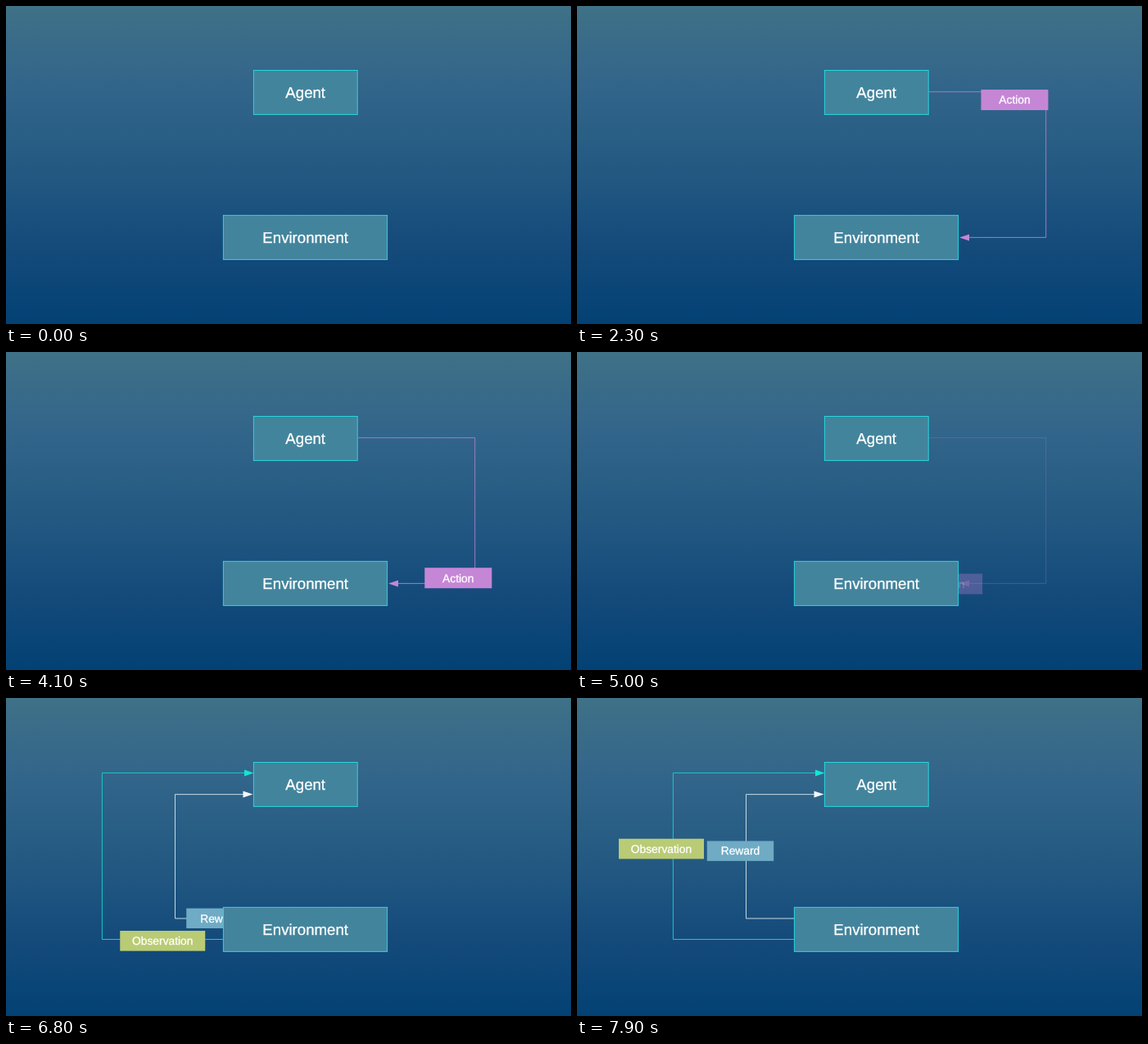
Animation, 690 px wide and 388 px high, one loop 8000 ms. Source, as an HTML page:

```html
<!DOCTYPE html>
<html lang="en">
<head>
<meta charset="utf-8">
<title>Agent and environment</title>
<style>
  html, body { margin: 0; height: 100%; overflow: hidden; background: #044073; }
  svg { display: block; width: 100%; height: 100%; }
  path { fill: none; }
  text {
    fill: #fff; stroke: #fff; stroke-width: .3; text-anchor: middle;
    font-family: "Liberation Sans", Arial, sans-serif; text-rendering: geometricPrecision;
  }
  .box rect { fill: #43849d; stroke: #27d6de; }
  .box text { font-size: 18.65px; }
  .label text { font-size: 13.8px; }
</style>
</head>
<body>
<svg viewBox="0 0 690 388">
  <defs>
    <linearGradient id="sky" x2="0" y2="1">
      <stop offset="0" stop-color="#3f7187"/>
      <stop offset=".25" stop-color="#32658a"/>
      <stop offset=".5" stop-color="#245a82"/>
      <stop offset=".75" stop-color="#154b7b"/>
      <stop offset="1" stop-color="#034174"/>
    </linearGradient>
    <marker id="head" markerWidth="12" markerHeight="8" refY="4" orient="auto" markerUnits="userSpaceOnUse">
      <path d="M0 0L12 4L0 8z" style="fill: context-stroke"/>
    </marker>
    <path id="action-route" d="M366 104.7H455C540 104.7 588 124 586 194C586 245 584 283 505 283H366"/>
    <path id="reward-route" d="M366 269H270C215 269 199.5 250 199.5 205V117.5"/>
    <path id="observation-route" d="M366 295.5H260C150 301 103 293 103 215V91.5"/>
  </defs>
  <rect width="690" height="388" fill="url(#sky)"/>

  <g id="request">
    <path stroke="#a17ac9" d="M430 104.7H572.7V282.4H478"/>
    <path d="M467 282.4l12 -4v8z" style="fill: #c586d6"/>
  </g>
  <g id="response">
    <path stroke="#17cbc9" d="M265 294.5H117.4V91.4H292"/>
    <path d="M302.5 91.4l-11.5 -4v8z" style="fill: #16e4d4"/>
    <path stroke="#c3d9e6" d="M265 269H206.5V117.6H290"/>
    <path d="M301.5 117.6l-12 -4v8z" style="fill: #f2f8fb"/>
  </g>

  <g id="action" class="label">
    <rect x="-41" y="-12.5" width="82" height="25" fill="#c586d6"/>
    <text y="4.8">Action</text>
  </g>
  <g id="reward" class="label">
    <rect x="-40.7" y="-12.2" width="81.4" height="24.4" fill="#6fabc4"/>
    <text y="4.8">Reward</text>
  </g>
  <g id="observation" class="label">
    <rect x="-52" y="-12.3" width="104" height="24.6" fill="#b9cb74"/>
    <text y="4.8">Observation</text>
  </g>

  <g class="box">
    <rect x="302.4" y="78.5" width="126.8" height="53.9"/>
    <text x="365.7" y="112.2">Agent</text>
    <rect x="265.4" y="255.4" width="200.2" height="54"/>
    <text x="365.7" y="289.2">Environment</text>
  </g>
</svg>
<script>
const LOOP = 8000, STEP = 100;
const $ = id => document.getElementById(id);

// Labels wait hidden behind a box, then follow their route at a steady speed in px/s
const trips = [
  { id: "action", start: 760, speed: 110 },
  { id: "reward", start: 5845, speed: 110 },
  { id: "observation", start: 5665, speed: 154 }
];

function ramp(t, from, to) {
  const u = Math.min(1, Math.max(0, (t - from) / (to - from)));
  return u * u * (3 - 2 * u);
}

function draw(t) {
  const leaving = 1 - ramp(t, 4550, 5270);
  $("request").setAttribute("opacity", ramp(t, 200, 950) * leaving);
  $("action").setAttribute("opacity", leaving);
  $("response").setAttribute("opacity", ramp(t, 4980, 5720));
  for (const { id, start, speed } of trips) {
    const distance = Math.max(0, t - start) / 1000 * speed;
    const { x, y } = $(id + "-route").getPointAtLength(distance);
    $(id).setAttribute("transform", `translate(${x} ${y})`);
  }
}

function tick() {
  const t = performance.now() % LOOP;
  draw(Math.floor(t / STEP) * STEP);
  requestAnimationFrame(tick);
}
tick();
</script>
</body>
</html>
```
